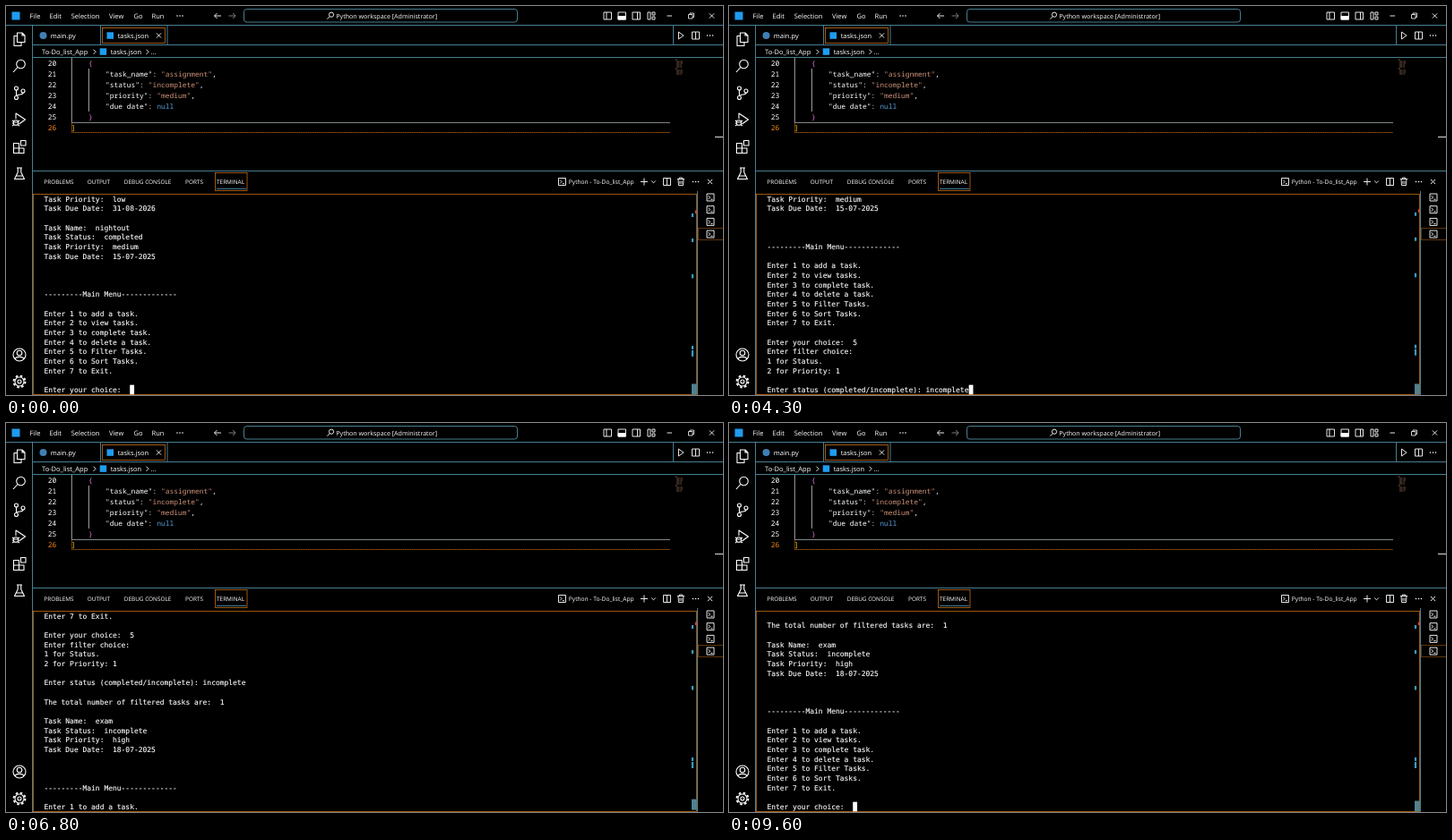
Animation of 800 by 435 pixels, one loop 9700 ms. Source, as an HTML page:

```html
<!DOCTYPE html>
<html lang="en">
<head>
<meta charset="utf-8">
<title>Task list terminal</title>
<style>
  html, body { margin: 0; width: 100%; height: 100%; overflow: hidden; background: #000; }
  svg { display: block; width: 800px; height: 435px; }
  text { fill: #fff; white-space: pre; text-rendering: geometricPrecision; }
  .ui { font-family: "Open Sans", "Noto Sans", sans-serif; }
  .menu text { font-size: 7.5px; }
  .panel text { font-size: 6.45px; }
  .code text { font: 500 7.95px "Noto Sans Mono", "DejaVu Sans Mono", monospace; }
  #rows text { font: 7.96px "DejaVu Sans Mono", monospace; stroke: #fff; stroke-width: .12; }
  .num text { text-anchor: end; }
  .str { fill: #ce9178; }
  .null { fill: #569cd6; }
  .code .brace { fill: #da70d6; }
  .code .bracket { fill: #ffd700; }
  .icon { fill: none; stroke: #fff; stroke-width: .9; stroke-linejoin: round; }
  .big { stroke-width: 1.1; }
  .edge { fill: none; stroke: #6fc3df; stroke-width: .65; }
  .focus { fill: none; stroke: #f38518; stroke-width: .65; }
  #pick { fill: #fff; mix-blend-mode: difference; }
</style>
</head>
<body>
<svg viewBox="0 0 800 435">
  <defs>
    <g id="split"><path d="M-4-4H4V4H-4ZM0-4V4"/></g>
    <g id="close"><path d="M-2.6-2.6 2.6 2.6M2.6-2.6-2.6 2.6"/></g>
    <g id="more" fill="#fff" stroke="none"><circle cx="-3" r=".8"/><circle r=".8"/><circle cx="3" r=".8"/></g>
    <g id="shell"><path d="M-4-4H4V4H-4ZM-2.4-2 -.4 0-2.4 2M.3 2.2H2.6"/></g>
    <g id="next"><path d="M-1.3-2.6 1.3 0-1.3 2.6"/></g>
  </defs>
  <rect width="800" height="435"/>

  <!-- title bar -->
  <rect x="6.5" y="6.5" width="9" height="9" fill="#1f9cf0"/>
  <g class="ui menu">
    <text x="26.5" y="13.8">File</text><text x="48.5" y="13.8">Edit</text>
    <text x="72.7" y="13.8">Selection</text><text x="115" y="13.8">View</text>
    <text x="142.6" y="13.8">Go</text><text x="162.5" y="13.8">Run</text>
  </g>
  <rect class="edge" x="265.5" y="3.5" width="305" height="14.5" rx="3"/>
  <text class="ui" x="368.3" y="13.6" font-size="7.1">Python workspace [Administrator]</text>
  <g class="icon">
    <use href="#more" x="194" y="11"/>
    <path d="M240 11H232.5M235.5 8 232.5 11 235.5 14"/>
    <path d="M248.5 11H256M253 8 256 11 253 14" stroke="#888"/>
    <circle cx="363" cy="9.7" r="2.6"/><path d="M361.2 11.6 358.3 14.6"/>
    <path d="M667 7H675.5V15H667ZM670 7V15"/>
    <path d="M683 7H691.5V15H683Z"/><rect x="683" y="11.5" width="8.5" height="3.5" fill="#fff"/>
    <path d="M699 7H707.5V15H699ZM704.5 7V15"/>
    <path d="M716 7H719V15H716ZM721 7H724V10H721ZM721 12H724V15H721Z"/>
    <path d="M737.5 11H743"/>
    <path d="M761.5 9.5H766V14H761.5ZM763 9.5V8H767.5V12.5H766" stroke-width=".8"/>
    <use href="#close" x="787.5" y="11"/>
  </g>

  <!-- frame lines -->
  <path class="edge" d="M0 21.5H800M29.5 21.5V435M105.5 22V43M180 22V43M744.5 22V43M30 43.5H800M30 57.5H800M30 184.5H800M771.5 207V435"/>

  <!-- activity bar -->
  <g class="icon big">
    <path d="M12.5 30H18L21 33V40.5H12.5ZM18 30V33H21M12.5 33.5H9V44.5H17V40.5"/>
    <circle cx="16.5" cy="65" r="4.8"/><path d="M13 68.5 8 74"/>
    <circle cx="11.5" cy="92" r="2"/><circle cx="11.5" cy="102.5" r="2"/><circle cx="19" cy="95" r="2"/>
    <path d="M11.5 94V100.5M19 97C19 100 14 98 11.7 100.5"/>
    <path d="M11 126V120L21.5 127 14.5 132"/><circle cx="11" cy="130.5" r="2.8"/>
    <path d="M7 128 8.5 129M7 131H8M7 134 8.7 132.8M15 128 13.5 129M15 134 13.3 132.8M8.2 130H13.8"/>
    <path d="M8.5 153.5H14.5V164.5H8.5ZM14.5 159H20V164.5H8.5M8.5 159H14.5M16.5 150.5H22V156H16.5Z"/>
    <path d="M12 181H18M13.2 181V186L9.5 193.5H20.5L16.8 186V181M11.5 190H18.5"/>
    <circle cx="15" cy="390" r="7"/><circle cx="15" cy="388" r="2.8"/><path d="M10 395C11 391.5 19 391.5 20 395"/>
    <circle cx="15" cy="420" r="5"/><circle cx="15" cy="420" r="2"/>
    <circle cx="15" cy="420" r="6.4" stroke-width="2" stroke-dasharray="2.5 2.527"/>
  </g>

  <!-- editor tabs -->
  <circle cx="41.5" cy="33" r="4" fill="#3f7fb5"/>
  <rect x="112.5" y="29.3" width="7.5" height="7.5" fill="#1f9cf0"/>
  <rect x="104.7" y="47.3" width="7.5" height="7.5" fill="#1f9cf0"/>
  <rect class="focus" x="107.5" y="24.5" width="70" height="17"/>
  <g class="ui menu">
    <text x="49.8" y="35.8">main.py</text><text x="124.7" y="35.8">tasks.json</text>
    <text x="40" y="53.8">To-Do_list_App</text><text x="116.7" y="53.8">tasks.json</text><text x="161.5" y="53.8">…</text>
  </g>
  <g class="icon">
    <use href="#close" x="170.5" y="33"/>
    <use href="#next" x="98.8" y="51.3"/><use href="#next" x="157.8" y="51.3"/>
    <path d="M750.5 29 756 33 750.5 37Z"/>
    <use href="#split" x="769.5" y="33"/><use href="#more" x="785.5" y="33"/>
  </g>

  <!-- editor -->
  <path d="M73.3 58V130M92.4 70V118" stroke="#fff" stroke-width=".65"/>
  <path d="M73 130.5H741" stroke="#c4d0d2" stroke-width=".65"/>
  <path class="focus" d="M73.3 131V141.5H741" stroke-dasharray="1.5 .5"/>
  <g class="code num" id="nums"></g>
  <g class="code">
    <text class="brace" x="91.9" y="66.9">{</text>
    <text x="111" y="78.9">"task_name": <tspan class="str">"assignment"</tspan>,</text>
    <text x="111" y="90.9">"status": <tspan class="str">"incomplete"</tspan>,</text>
    <text x="111" y="102.9">"priority": <tspan class="str">"medium"</tspan>,</text>
    <text x="111" y="114.9">"due date": <tspan class="null">null</tspan></text>
    <text class="brace" x="91.9" y="126.9">}</text>
    <text class="bracket" x="72.8" y="138.9">]</text>
  </g>
  <path d="M746.5 60H749M748 62H755M748 64H755M748 66H754M748 68H754M746.5 70H749M748 72H755M748 74H755M748 76H754"
        stroke="#86604f" stroke-width=".8" stroke-dasharray="3.5 .8"/>
  <path d="M791 146.5H800" stroke="#ddd"/>

  <!-- panel header -->
  <g class="ui panel">
    <text x="42.3" y="198.9">PROBLEMS</text><text x="90.7" y="198.9">OUTPUT</text>
    <text x="131.7" y="198.9">DEBUG CONSOLE</text><text x="200" y="198.9">PORTS</text>
    <text x="235" y="198.9">TERMINAL</text>
  </g>
  <text class="ui" x="627.8" y="199" font-size="6.65">Python - To-Do_list_App</text>
  <path class="edge" d="M235 204.5H268"/>
  <rect class="focus" x="233.5" y="186.5" width="35.5" height="20"/>
  <g class="icon">
    <use href="#shell" x="620.5" y="196.5"/>
    <path d="M708 196.5H716M712 192.5V200.5M720.2 195.5 722.5 197.8 724.8 195.5"/>
    <use href="#split" x="737.5" y="196.5"/>
    <path d="M749 193.5H757M751.5 193.5V192H754.5V193.5M750 193.5 750.5 200.5H755.5L756 193.5M752 195.5V199M754 195.5V199"/>
    <use href="#more" x="769.5" y="196.5"/><use href="#close" x="785.5" y="196.5"/>
    <use href="#shell" x="786" y="214"/><use href="#shell" x="786" y="227.7"/>
    <use href="#shell" x="786" y="241.4"/><use href="#shell" x="786" y="255.1"/>
  </g>
  <rect class="focus" x="772.5" y="248.5" width="28" height="13" stroke-opacity=".6"/>

  <!-- terminal -->
  <rect class="focus" x="30.5" y="210.3" width="740" height="224.2"/>
  <g id="marks">
    <path d="M766 232V236M766 260V264M766 300V304.5M766 380V384M766 385V392" stroke="#3a9cc0" stroke-width="2.2"/>
    <path d="M769.8 228.5V232" stroke="#d04a3a" stroke-width="2"/>
  </g>
  <rect id="slider" x="765" width="5.5" height="12" fill="#4f8294"/>
  <rect id="cursor" width="4.8" height="10.65" fill="#fff"/>
  <g id="rows"></g>
  <rect id="pick" height="10.65"/>
</svg>

<script>
const LOOP = 9700, ROWS = 21, LEFT = 42.4, TOP = 210.7, PITCH = 10.65, CELL = 4.792;
const $ = id => document.getElementById(id);

function addText(parent, x, y, value = "") {
  const el = document.createElementNS("http://www.w3.org/2000/svg", "text");
  el.setAttribute("x", x);
  el.setAttribute("y", y);
  el.textContent = value;
  return parent.appendChild(el);
}

function place(el, attrs) {
  for (const name in attrs) el.setAttribute(name, attrs[name]);
}

for (let n = 20; n <= 26; n++) {
  addText($("nums"), 56.3, 66.9 + (n - 20) * 12, n).style.fill = n === 26 ? "#f38518" : "#fff";
}
const rows = Array.from({ length: ROWS }, (_, i) => addText($("rows"), LEFT, TOP + 8.1 + i * PITCH));

const task = (name, status, priority, due) => [
  `Task Name:  ${name}`, `Task Status:  ${status}`,
  `Task Priority:  ${priority}`, `Task Due Date:  ${due}`,
];
const menu = [
  "", "", "", "---------Main Menu-------------", "",
  "Enter 1 to add a task.", "Enter 2 to view tasks.", "Enter 3 to complete task.",
  "Enter 4 to delete a task.", "Enter 5 to Filter Tasks.", "Enter 6 to Sort Tasks.",
  "Enter 7 to Exit.", "",
];
const intro = [
  "Task Priority:  low", "Task Due Date:  31-08-2026", "",
  ...task("nightout", "completed", "medium", "15-07-2025"), ...menu,
];
const ask = "Enter your choice:  ";
const clamp = (v, lo, hi) => Math.min(hi, Math.max(lo, v));
const typed = (word, t, start, step) => word.slice(0, Math.max(0, Math.floor((t - start) / step) + 1));

function output(t) {
  const out = [...intro, ask + typed("5", t, 500, 100)];
  if (t >= 900) out.push("Enter filter choice:", "1 for Status.", "2 for Priority: " + typed("1", t, 1500, 100));
  if (t >= 1900) out.push("", "Enter status (completed/incomplete): " + typed("incomplete", t, 2800, 120));
  if (t >= 4600) {
    out.push("", "The total number of filtered tasks are:  1", "",
      ...task("exam", "incomplete", "high", "18-07-2025"), ...menu, ask);
  }
  return out;
}

// Lines scrolled back by the wheel, two per tick
function scrolled(t) {
  const up = 2 * Math.floor((t - 5300) / 100);
  const down = 8 - 2 * Math.floor((t - 9100) / 100);
  return clamp(Math.min(up, down), 0, 8);
}

function draw(now) {
  const t = Math.floor((now % LOOP) / 100) * 100;
  const out = output(t), back = scrolled(t);
  const first = out.length - ROWS - back;
  rows.forEach((row, i) => {
    const line = out[first + i];
    if (row.textContent !== line) row.textContent = line;
  });

  const shift = (out.length - ROWS) * -0.23;
  $("marks").setAttribute("transform", `translate(0 ${shift})`);
  place($("slider"), { y: 422.5 - back * .23 });

  place($("cursor"), {
    x: LEFT + out[out.length - 1].length * CELL,
    y: TOP + (ROWS - 1) * PITCH,
    visibility: back ? "hidden" : "visible",
  });

  // Selection dragged leftwards from column 45
  const from = t < 9100 ? clamp(Math.ceil(45 - (t - 7600) * .045), 0, 45) : 45;
  place($("pick"), { x: LEFT + from * CELL, y: TOP + 9 * PITCH, width: (45 - from) * CELL });
}

function tick() {
  draw(performance.now());
  requestAnimationFrame(tick);
}
tick();
</script>
</body>
</html>
```
